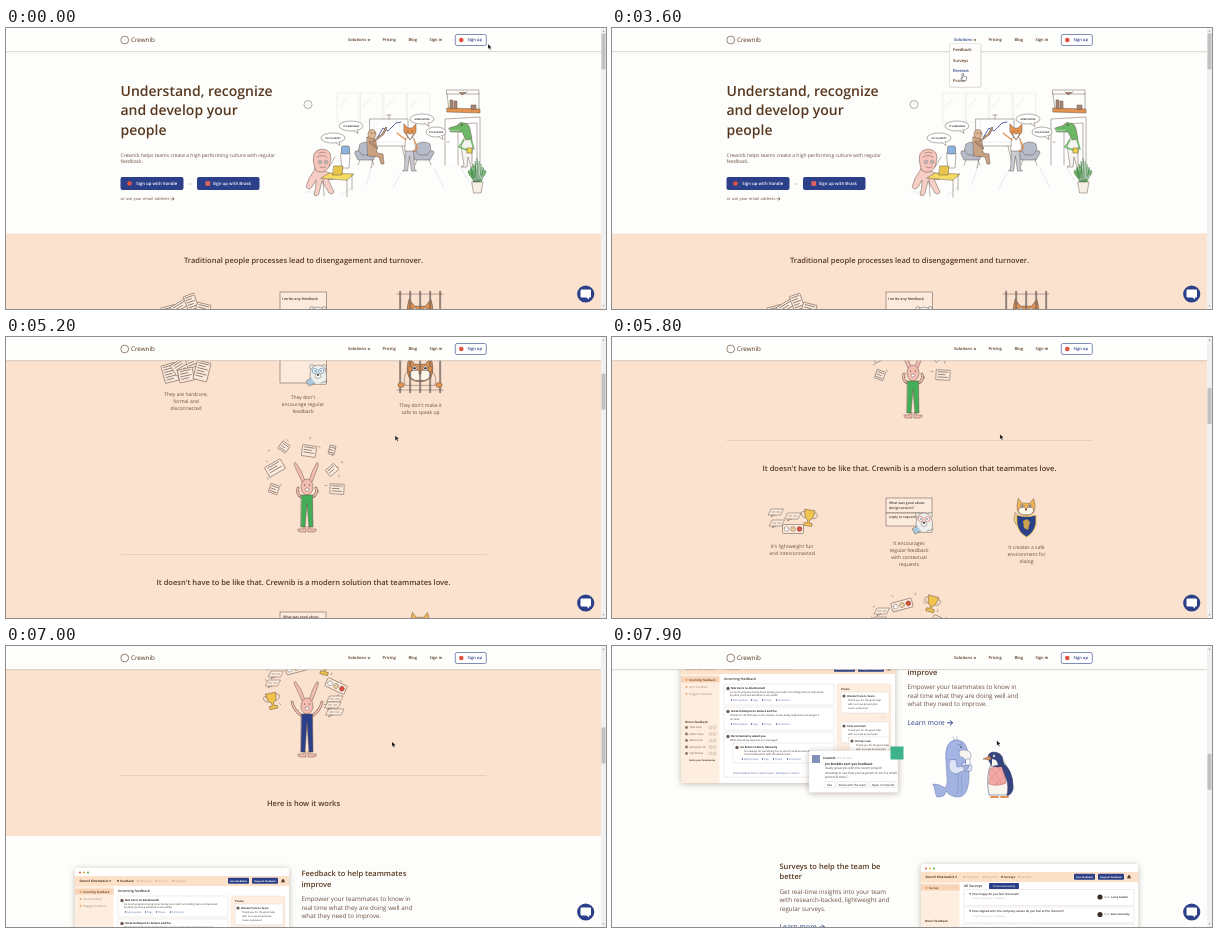
Animation, 600 px wide and 281 px high, one loop 8 s. Source, as an HTML page:

```html
<!DOCTYPE html>
<html lang="en">
<head>
<meta charset="utf-8">
<title>Crewnib</title>
<style>
html, body { margin: 0; width: 100%; height: 100%; overflow: hidden; background: #fdfefb; }
svg { display: block; width: 100vw; height: 100vh; font-family: "Open Sans", sans-serif; text-rendering: geometricPrecision; }
.raised { filter: drop-shadow(0 1.5px 3px #5a3a2559); }
</style>
</head>
<body>
<svg id="stage" viewBox="0 0 600 281"></svg>
<script>
const BROWN = '#57371f', SOFT = '#6b5145', NAVY = '#2c4089', PEACH = '#fae2cf', WHITE = '#fdfefb', CREAM = '#fcebdd',
  LINE = '#5f4a42', ORANGE = '#e3924f', PINK = '#f4bdb2', GOLD = '#f0c44c', PALE = '#dcdad7', INK = '#3d332e';

// Drawing helpers; every one returns SVG markup.
const T = (x, y, size, str, fill = BROWN, weight = 400, anchor = 'start') =>
  `<text x="${x}" y="${y + size * .36}" font-size="${size}" fill="${fill}" font-weight="${weight}" text-anchor="${anchor}">${str}</text>`;
const lines = (x, y, step, size, rows, ...style) => rows.map((s, i) => T(x, y + i * step, size, s, ...style)).join('');
const P = (d, fill = 'none', stroke = LINE, w = .45) =>
  `<path d="${d}" fill="${fill}" stroke="${stroke}" stroke-width="${w}" stroke-linecap="round" stroke-linejoin="round"/>`;
const R = (x, y, w, h, fill, stroke = 'none', r = 0, sw = .5) =>
  `<rect x="${x}" y="${y}" width="${w}" height="${h}" rx="${r}" fill="${fill}" stroke="${stroke}" stroke-width="${sw}"/>`;
const E = (x, y, rx, ry, fill, stroke = LINE, w = .45) =>
  `<ellipse cx="${x}" cy="${y}" rx="${rx}" ry="${ry}" fill="${fill}" stroke="${stroke}" stroke-width="${w}"/>`;
const C = (x, y, r, fill, stroke = 'none', w = .45) => E(x, y, r, r, fill, stroke, w);
const G = (x, y, turn, body, scale = 1) => `<g transform="translate(${x} ${y}) rotate(${turn}) scale(${scale})">${body}</g>`;
const raised = body => `<g class="raised">${body}</g>`;
const range = n => [...Array(n).keys()];
const arrow = (x, y, s, fill) => P(`M${x},${y}h${s}m${-s * .45},${-s * .45}l${s * .45},${s * .45}l${-s * .45},${s * .45}`, 'none', fill, s * .2);
const eyes = (x, y, gap, r = .7) => C(x - gap, y, r, '#333') + C(x + gap, y, r, '#333');

const paper = (x, y, w, h, turn) => G(x, y, turn, R(-w / 2, -h / 2, w, h, CREAM, LINE, .4) +
  range(Math.floor(h / 3)).map(i => P(`M${-w * .35},${-h / 2 + 2 + i * 2.6}h${w * (i % 2 ? .5 : .7)}`, 'none', LINE, .6)).join(''));
const bubble = (x, y, w, str) => E(x, y, w, 5, '#fff') +
  P(`M${x + 3},${y + 4.6}l4,3l-1,-4`, '#fff') + T(x, y, 2.3, str, '#333', 700, 'middle');
const trophy = (x, y, turn) => G(x, y, turn, P('M-5,-5q-5,0 -2,5q2,2 4,1M5,-5q5,0 2,5q-2,2 -4,1') +
  P('M-5,-7h10q0,9 -4,10v3h3v3h-8v-3h3v-3q-4,-1 -4,-10z', GOLD));
const faces = (x, y, turn) => G(x, y, turn, R(-10.5, -4.5, 21, 9, CREAM, LINE, 1) +
  ['#fff', '#f3d9a6', '#e5533f'].map((c, i) => C(-6.5 + i * 6.5, 0, 2.4, c, LINE) + eyes(-6.5 + i * 6.5, -.5, .8, .25)).join(''));
const chat = (x, y, w) => G(x, y, 0, P(`M${-w / 2 + 1.5},-3h${w}l-3,6h${-w}zM${-w / 2 + 2},3l-1,2l4,-2M${-w * .35},0h${w * .25}m2,0h${w * .25}`, CREAM));
const confetti = (x, y) => range(14).map(i => {
  const a = i * 2.4, r = 29 + (i * 7) % 17;
  return P(`M${x + r * Math.cos(a)},${y - 20 + r * .7 * Math.sin(a)}l${2 * Math.cos(i)},${2 * Math.sin(i)}`);
}).join('');

function office() {
  const windows = range(4).map(i => R(331 + i * 23.5, 65, 22, 29, 'none', PALE, 0, .4) + P(`M${333 + i * 23.5},80l8,-10`, 'none', PALE)).join('');
  const chair = x => P(`M${x - 8},123q-4,-1 -3,3l3,6h15l4,-7q0,-3 -3,-2l-1,-7q-6,-4 -13,0zM${x - 6},132l-2,5M${x + 6},132l2,5`, '#b7bccb') + P(`M${x - 7},123l3,4h8l3,-4`);
  const sloth = P('M361,109q6,-2 9,4l1,12l6,1l1,10h-3l-2,-7l-11,-1z', '#c9a282') + P('M368,113l9,-7l3,-6M364,114l7,6', 'none', LINE, 2) +
    P('M368,113l9,-7l3,-6M364,114l7,6', 'none', '#c9a282', 1.2) + E(366, 106, 4, 4.5, '#ddb794') + eyes(367, 105, 1.5, .6);
  const fox = P('M399.500,121l-1,20l-2,2h5l2,-15l2,15h5l-2,-2l-1,-20z', '#c9cbd2') + P('M400,110q5,-2 8,0l2,13h-11z', '#fff') +
    P('M398,96l4,4h4l4,-4v8l-6,8l-6,-8z', ORANGE) + P('M400,105l4,7l4,-7l-4,1z', '#fff') + eyes(404, 103, 2, .5) + P('M400,112l-9,-7M408,112l4,8l-5,3', 'none', ORANGE, 1.2);
  const croc = P('M439,137v-46l35,-2v48M452,137v-41l19,-1v42M441,114h2', '#fff') +
    P('M459,109q-5,5 -3,16l2,12l-3,2h6l1,-10l3,10h4l-3,-3v-12q2,-9 -1,-14z', '#f6f5f2') +
    P('M443,100l10,-3q1,-4 4,-2q6,0 7,6l2,10l-6,1l-4,-8l-11,0z', '#6cb866') + C(456, 97, .7, '#222') +
    P('M445,102l2,1l2,-1l2,1l2,-1', 'none', '#fff') + P('M458,112l-5,7l8,3M465,112l3,9', 'none', '#6cb866', 1.5) + R(461, 120, 5, 5, '#ecd94a', LINE);
  const octopus = P('M309,141q-7,9 -9,18q3,4 6,0l4,-7q0,9 -2,15q4,2 5,-2l3,-12l7,12q4,2 5,-1l-6,-13q7,2 8,-3l-9,-4z', '#f6cec5') +
    P('M309,141q-6,-19 7,-20q12,1 8,14q-1,7 -7,9q-6,1 -8,-3z', '#f6c6bc') + P('M311,129q5,-3 10,0M313,125q4,-2 7,0') + C(314, 134, 1.8, '#fff', LINE) + C(320, 134, 1.8, '#fff', LINE) +
    eyes(317, 134, 3, .7) + P('M314,139q3,2 6,0M323,139l6,-10');
  const desk = P('M315,150l8,-5l25,1l-7,6zM317,151l1,17M341,152v17M346,147v15', '#f4dc63') + P('M328,138h9l-1,9h-9z', '#e9c64a');
  const plant = range(9).map(i => P(`M471,156q${(i - 4) * 3},-12 ${(i - 4) * 2},${-26 + Math.abs(i - 4) * 3}q${5 - i},8 ${4 - i},${26 - Math.abs(i - 4) * 3}`, i % 2 ? '#4d9b57' : '#75b968', '#347041', .35)).join('') +
    P('M466,154h11l-2,11h-7z', '#f5f0e6');
  return windows + C(302, 76.5, 4, WHITE, LINE) + P('M302,74v2.5h2', 'none', PALE) +
    P('M345,160l-10,7M366,137l-6,20M395,145l-8,15M428,140l10,20M300,164h9M455,140l8,14', 'none', '#e3e2e8', .8) +
    P('M441,62h32v4h-32zM441,66l2,16M473,66v16', 'none') + P('M441,80l33,1v4l-33,-1z', ORANGE) + P('M453,64l3,3l5,-3M444,80v-8h3v8zM448,80v-7h3v7zM465,81v-4h5v4z', '#a98772') +
    P('M364,91h38v27h-38zM370,118l-5,22M396,118l5,22M383,91v-4M381,87h4', '#fff') +
    P('M371,110l6,-10l5,3l8,-8l5,-1', 'none', NAVY, .8) + P('M368,94v20h30', 'none', PALE) +
    P('M335,125h9l-1,15h-7z', '#fff') + R(335.5, 118, 8, 8, '#8bb4e2', LINE, 1.5) + chair(360) + chair(417) + sloth + fox + croc + octopus + desk + plant +
    bubble(327, 110, 12, "I'M SO HAPPY") + bubble(345, 98, 12, "IT'S AWESOME") + bubble(416, 91, 12, 'GREAT WORK') + bubble(430, 104, 10, 'YOU ROCKED');
}

const bear = (x, y, glasses) => C(x - 6, y - 7, 2.4, '#eef0ee', LINE) + C(x + 6, y - 7, 2.4, '#eef0ee', LINE) +
  P(`M${x - 7},${y + 10}q-4,-19 7,-19q11,0 8,19z`, '#eef0ee') + C(x - 3.3, y - 3, 2.5, '#fff', glasses, .8) + C(x + 3.3, y - 3, 2.5, '#fff', glasses, .8) +
  eyes(x, y - 3, 3, .7) + E(x, y + 2, 3, 2.3, '#fff') + C(x, y + 1, 1, '#333') + P(`M${x - 7},${y + 4}l-5,3l3,5l6,-3M${x + 3},${y + 9}l6,-2`, '#a9c9de');
const catHead = (x, y, s, fur) => G(x, y, 0, P('M-8,-10l4,5h8l4,-5q3,9 0,15q-8,6 -16,0q-3,-6 0,-15z', fur) +
  P('M-8,1q5,-4 8,0q3,-4 8,0q0,7 -8,6q-8,1 -8,-6z', '#fff6ea') + C(-4, -2, 1.8, '#fff', LINE) + C(4, -2, 1.8, '#fff', LINE) + eyes(0, -2, 4, .9) + C(0, 1.5, 1, '#704030'), s);

// The limbs are drawn twice: a dark outline below a thinner fill.
function bunny(x, y, pants, feet, arms) {
  return G(x, y, 0, P('M-2,-6Q-5,-17 -11.500,-24.500q-2,0 -1,3Q-8,-12 -5,-5zM2,-6Q5,-17 10,-24.500q2,0 1,4Q8,-12 5,-5z', PINK) +
    E(0, 0, 6, 8, PINK) + eyes(0, -2, 2.5, .6) + E(0, 2.5, 2, 1.5, '#fff') + P(arms, 'none', LINE, 2.6) + P(arms, 'none', PINK, 1.7) +
    P(`M-5.500,8h11l.5,${feet - 11}h-4l-2,${19 - feet}l-2,${feet - 19}h-4z`, pants) +
    P(`M-3,${feet - 3}v2l-6,0q-1,2 2,3h6v-5zM3,${feet - 3}v2l6,0q1,2 -2,3h-6v-5z`, PINK));
}

function features() {
  const bars = range(5).map(i => R(393.5 + i * 10, 263, 1.3, 44, '#8a817d', LINE, .5, .3)).join('');
  const cage = P('M399,299q-3,-10 4,-15l5,-2h12l5,2q7,6 4,15z', PEACH) + catHead(414, 285, 1.35, ORANGE) + bars +
    P('M391,266h46M391,304h46') + E(395, 299, 3.2, 2.5, ORANGE) + E(433, 299, 3.2, 2.5, ORANGE) + E(404, 283, 2, 2.8, ORANGE) + E(424, 283, 2, 2.8, ORANGE);
  const caption = (x, y, ...rows) => lines(x, y, 7, 5, rows, SOFT, 400, 'middle');
  const knight = P('M403,541q-3,10 4,14l3,-8z', '#f3d18f') + catHead(414, 536, .95, '#eeb356') +
    P('M405,543q9,3 19,0v9q-2,9 -9.500,13q-8,-4 -9.500,-13z', NAVY, GOLD, .9) + P('M411,549l4,-2l3,3l-2,8l-4,-2z', '#c9a24b', 'none');
  return paper(164, 287, 14, 18, -15) + paper(175, 280, 18, 12, -32) + paper(185, 274, 11, 15, -20) + paper(180, 289, 15, 13, -12) + paper(196, 285, 14, 19, 14) +
    R(274, 264, 46.5, 33, CREAM, LINE) + T(276, 270.5, 3.7, 'I write any feedback', '#4c3830', 600) + bear(312, 288, '#5a93bd') + cage +
    caption(180, 308.5, 'They are hardcore,', 'formal and', 'disconnected') +
    caption(297, 311, "They don't", 'encourage regular', 'feedback') + caption(414.5, 319, "They don't make it", 'safe to speak up') +
    confetti(301, 401) + paper(278, 361, 9, 9, 35) + paper(303, 365, 14, 11, 8) + paper(326, 364, 6, 9, 15) + paper(269, 382, 18, 11, -30) +
    paper(326, 384, 11, 8, -40) + paper(268, 403, 9, 9, 20) + paper(331, 403, 14, 10, 3) + bunny(301, 401, '#43ae58', 43, 'M-5,10q-6,-2 -4,-9M5,10q6,-2 4,-9') +
    P('M115,468.500H480', 'none', '#d5b9a8', .5) +
    T(297.5, 496, 7.5, "It doesn't have to be like that. Crewnib is a modern solution that teammates love.", BROWN, 600, 'middle') +
    chat(164, 540, 12) + chat(181, 544, 13) + chat(165, 551, 12) + faces(181, 557, 0) + trophy(197, 545, 8) +
    R(274, 526, 46, 15, CREAM, LINE) + lines(277, 531, 5.2, 3.4, ['What was good about', 'design session?'], '#4c3830', 600) +
    R(274, 541, 37, 13, CREAM, LINE) + T(277, 545, 3.3, '(reply to request)', '#4c3830', 600) + bear(312, 550, '#d8706a') + knight +
    caption(180, 574, "It's lightweight fun", 'and interconnected') +
    caption(297, 571, 'It encourages', 'regular feedback', 'with contextual', 'requests') + caption(414.5, 575, 'It creates a safe', 'environment for', 'dialog') +
    confetti(300, 671) + faces(290, 633, -15) + trophy(320, 631, 15) + chat(270, 639, 12) + chat(267, 648, 12) + faces(330, 651, 25) +
    trophy(266, 665, -12) + chat(329, 664, 13) + chat(327, 670, 13) + chat(329, 677, 15) + bunny(301, 671, NAVY, 49, 'M-5,10q-8,-5 -10,-14M5,10q8,-5 10,-14');
}

const person = (x, y, name) => C(x, y, 1.7, '#6f5d54') + T(x + 3, y - .8, 2.7, name, '#2e2622', 700);
const actions = (x, y) => ['Add a praise', 'Flag', 'Thank', 'Comment'].map((s, i) => {
  const ax = x + [0, 20, 31, 45][i];
  return C(ax - 1.5, y, .7, NAVY) + T(ax, y, 2.5, s, '#4f63a4');
}).join('');

// Shared frame of the two product screenshots.
function app(x, y, w, h, tab) {
  const side = tab ? ['Survey'] : ['Incoming feedback', 'Sent feedback', 'Flagged feedback'];
  const crew = ['Tilda Nork', 'Edwin Trass', 'Moira Lusk', 'Fernando Od.', 'Suki Dranel'];
  return raised(R(x, y, w, h, '#fff', 'none', 1.5)) +
    ['#e8604f', '#edb63e', '#5cb955'].map((c, i) => C(x + 5 + i * 4, y + 4.5, 1.1, c)).join('') +
    R(x, y + 8, w, 10, '#fce0c8') + R(x, y + 18, 38.5, h - 18, '#fdeee0') +
    T(x + 4.5, y + 12.8, 3.2, 'Dovrel Kinematics ▾', BROWN, 700) +
    ['Feedback', 'Requests', 'Surveys', 'Reviews'].map((s, i) => {
      const tx = x + [45, 65, 83, 100][i], on = i === tab * 2;
      return C(tx - 2, y + 12.8, .9, on ? BROWN : '#c9a58d') + T(tx, y + 12.8, 2.9, s, on ? BROWN : '#c9a58d', on ? 700 : 400);
    }).join('') +
    R(x + 153, y + 9.8, 21, 6, NAVY, 'none', .8) + T(x + 163.5, y + 12.8, 2.4, 'Give feedback', '#fff', 700, 'middle') +
    R(x + 177, y + 9.8, 26, 6, NAVY, 'none', .8) + T(x + 190, y + 12.8, 2.4, 'Request feedback', '#fff', 700, 'middle') +
    P(`M${x + 206.5},${y + 14}q.5,-3 1.500,-3q1,0 1.500,3z`, BROWN) +
    R(x, y + 20.5, 38.5, 6, '#f9d3b5') +
    side.map((s, i) => C(x + 5.5, y + 23.8 + i * 7, .9, ORANGE) + T(x + 8, y + 23.8 + i * 7, 2.9, s, i ? '#a98975' : BROWN, i ? 400 : 600)).join('') +
    (tab ? T(x + 4, y + 56.5, 2.9, 'Direct feedback', BROWN, 700) :
      T(x + 4, y + 65.5, 2.9, 'Direct feedback', BROWN, 700) + crew.map((s, i) => {
        const cy = y + 71.5 + i * 6.5;
        return C(x + 5.5, cy, 1.4, '#8d7468') + T(x + 8.5, cy, 2.6, s, SOFT) + C(x + 29.5, cy, 1.4, 'none', '#a98975', .4) + C(x + 33.5, cy, 1.4, 'none', '#a98975', .4);
      }).join('') + T(x + 8, y + 104.5, 2.3, 'Invite your teammates', BROWN, 700));
}

function feedbackApp() {
  const card = (x, y, w, h) => R(x, y, w, h, '#fff', '#d6d0cb', 1, .4);
  const praise = (x, y, w, name) => card(x, y, w, 21) + C(x + 3, y + 4, 1.6, '#6f5d54') + T(x + 6, y + 4, 2.6, name, INK, 700) +
    lines(x + 7, y + 8.5, 3.7, 2.5, ['Thank you for the great help', 'with our new project plan', 'It was a pleasure!'], INK);
  return app(69, 833, 214, 127, 0) + T(112, 855.3, 3.5, 'Incoming feedback', INK, 600) +
    card(112, 861, 110, 21) + person(116, 865.5, 'Nils Varro to Ada Brumell') + lines(118, 869, 3.5, 2.6, ['So much progress being done during your talk! I am sitting here so impressed', 'by what you have achieved in one week.'], INK) + actions(121, 877) +
    card(112, 884, 110, 23) + person(116, 888.5, 'Greta Holmquin to Anders and Pia') + lines(118, 892.5, 3.5, 2.6, ['Thanks for all the help on the release. It was easily explained and we got it', 'on time.'], INK) + actions(121, 901) +
    card(112, 909, 110, 45) + person(116, 913.5, 'Boris Hannetty asked you') + T(118, 917, 2.6, 'What should we improve as a manager?', INK) +
    card(121, 920, 101, 20) + person(125, 924.5, 'Ivo Brenn to Boris Hannetty') + lines(132, 928, 3.5, 2.6, ['You always do something for us and it could be even better to get', 'more transparent with the whole team.'], INK) + actions(132, 936) +
    T(121, 950, 2.6, 'View feedback from 3 teammates • Waiting for 4 others', '#4f63a4') +
    R(225, 861, 54, 95, '#fdeee0', '#f1dccb', 1, .4) + T(229, 865.5, 2.8, 'Praise', BROWN, 700) +
    praise(229, 869, 48, 'Wanda Prule to Team') + T(267, 894, 2.4, '♡  ▢', '#b99b88') + praise(229, 899, 48, 'Tilda and Nork') + praise(237, 914, 40, 'Wendy Lusk') +
    raised(R(197, 927.5, 89, 42, '#fff', '#e4dfda', 2, .4)) +
    R(200, 932, 8, 8, '#8390b9') + T(211, 935, 3, 'Crewnib', '#2e2a28', 700) + T(225, 935, 2.3, 'APP  9:41 AM  ☆', '#a29b96') +
    T(213, 940.5, 3.15, 'Jon Breddle sent you feedback', '#2e2a28', 700) +
    lines(213, 945, 4.6, 3.15, ['Really great job with the recent project!', "Amazing to see how you've grown in such a small", 'period of time 👏'], '#4a4542') +
    [[212, 11, 'Like'], [225, 31, 'Share with the team'], [258, 26, 'Open in Crewnib']].map(([x, w, s]) => card(x, 958.5, w, 6) + T(x + w / 2, 961.5, 2.8, s, '#4a4542', 600, 'middle')).join('') +
    R(278.5, 923.5, 13, 13, '#3eb28a');
}

function surveyApp() {
  const row = (y, q, name) => R(352, y, 170, 16, '#fff', '#d6d0cb', 1, .4) + T(357, y + 4, 2.9, '✎  ' + q, INK, 600) +
    T(361, y + 9, 2.4, 'Sent to everyone • 9 answers', '#b5aca6') + C(488, y + 7.5, 2.6, '#3a2d28') + T(492, y + 7.5, 2.5, 'From', SOFT) + T(499, y + 7.5, 2.5, name, INK, 700);
  return app(309, 1041, 217, 127, 1) + T(352, 1063, 3.5, 'All Surveys', INK, 600) + R(377, 1060, 30, 6, NAVY, 'none', .8) +
    T(392, 1063, 2.5, 'Create new survey', '#fff', 600, 'middle') + row(1066.5, 'How happy do you feel this week?', 'Lorna Teskell') +
    row(1084, 'How aligned with the company values do you feel at the moment?', 'Boris Hannetty') + row(1101, 'What do you think about our way of working?', 'Ada Brumell');
}

const SEA = '#a3b3e2', SEA_LINE = '#5a69a3', COAT = '#37457f';
const narwhal = P('M334,938q-2,-19 9,-21q11,-1 13,13l1,16q1,27 -10,28q-9,0 -13,-6q0,6 -9,6q-2,-3 -2,-7l-2,-6q7,0 12,4q3,-4 2,-10z', SEA, SEA_LINE) +
  P('M346,951q1,12 -1,20M349,953q2,10 0,18', 'none', '#8596cf', .7) + P('M342,917l-1,-3M345,917v-3', 'none', SEA_LINE) +
  P('M347,928q6,-3 11,1q3,6 -2,8q-4,1 -5,-3q-4,2 -4,-6z', '#f7f3ee', SEA_LINE) + C(349, 924, .8, '#333') + P('M346,922l4,-1', 'none', SEA_LINE) +
  P('M338,937q-4,12 6,14l12,-5l1,-4l-12,2l-1,-7zM350,940q7,-2 10,3l-1,5l-6,0z', '#dfe5f7', SEA_LINE) + P('M354,936h4v6h-4z', '#fff', SEA_LINE);
const penguin = P('M380,939q-7,13 -3,33h16q9,-2 8,-9q-1,-14 -9,-24z', '#f9f4ee', '#27315c') +
  P('M378,946q7,-5 14,-1l2,15q-9,4 -17,1z', '#f2a9a4', '#a8575c') + P('M378,942l12,19M377,951l9,10M384,942l9,13M390,944l-12,13M393,952l-9,9', 'none', '#c9727a', .35) +
  P('M389,939q12,7 12,25q0,7 -6,9q2,-11 -1,-18q-4,-8 -5,-16z', COAT, '#27315c') +
  P('M377,938q-3,-8 4,-9q9,0 10,8l1,6q-6,2 -12,0z', COAT, '#27315c') + P('M380,936q5,0 6,6l-6,1z', '#f9f4ee', 'none') +
  P('M378,933l-7,3l8,1z', ORANGE) + C(382, 933, 1.2, '#fff') + C(382, 933, .6, '#222') + P('M379,974h7M389,974h7', 'none', ORANGE, 1.8);

const pitch = (x, y, title, body) => lines(x, y, 10.5, 7.5, title, BROWN, 600) + lines(x, y + 25.5, 8.6, 6.25, body, SOFT) +
  T(x, y + 61, 6.9, 'Learn more', NAVY) + arrow(x + 40, y + 61.3, 5, NAVY);
const cta = (x, w, label, mark) => R(x, 149, w, 13, NAVY, 'none', 2) + mark + T(x + 15.8, 155.7, 4.3, label, '#fff', 600);

const page = R(0, 205.5, 595, 595.5, PEACH) +
  lines(114.5, 63.2, 19.2, 14, ['Understand, recognize', 'and develop your', 'people'], BROWN, 600) +
  lines(114.5, 126.7, 6.8, 5, ['Crewnib helps teams create a high performing culture with regular', 'feedback.'], SOFT) +
  cta(114.5, 63, 'Sign up with Vondle', C(123.5, 155.5, 2.3, '#e0523f')) + T(182, 155.7, 4, 'or', '#c3b7ae') +
  cta(191, 62.5, 'Sign up with Brask', R(199.5, 153.2, 4.6, 4.6, '#e0655f')) +
  T(114.5, 171, 4.05, 'or use your email address', SOFT) + arrow(165, 170.9, 3, BROWN) + office() +
  T(297.5, 232.5, 7.5, 'Traditional people processes lead to disengagement and turnover.', BROWN, 600, 'middle') + features() +
  P('M115,740.500H480', 'none', '#d5b9a8', .5) + T(297.5, 768, 7.5, 'Here is how it works', BROWN, 600, 'middle') + feedbackApp() +
  pitch(295.5, 838.5, ['Feedback to help teammates', 'improve'], ['Empower your teammates to know in', 'real time what they are doing well and', 'what they need to improve.']) + narwhal + penguin +
  pitch(167.5, 1042.8, ['Surveys to help the team be', 'better'], ['Get real-time insights into your team', 'with research-backed, lightweight and', 'regular surveys.']) + surveyApp();

const NAV = [[342, 25, 'Solutions'], [376.5, 14, 'Pricing'], [402.5, 9, 'Blog'], [423.5, 14, 'Sign in']];
const MENU = ['Feedback', 'Surveys', 'Reviews', 'Praise'];
const link = (x, y, s) => `<g class="link">${T(x, y, 4.05, s, 'inherit', 600)}</g>`;
const header = R(0, 23, 595, 1.5, '#8b7a6a22') + R(0, 0, 595, 23, '#fefefc') + R(0, 23, 595, .6, '#d8d0c9') +
  C(118.7, 12, 3.9, 'none', BROWN, .6) + T(125, 12.2, 6.25, 'Crewnib', BROWN) + NAV.map(([x, , s]) => link(x, 12, s)).join('') +
  P('M361.800,11.500h2.400l-1.200,1.500z', BROWN, BROWN, .2) + '<g id="signup">' + R(449.3, 6.5, 31, 11, 'inherit', NAVY, 1.8, .6) + '</g>' +
  C(455.3, 12, 2.3, '#e0523f') + T(461.5, 12, 4.1, 'Sign up', NAVY, 600);
const dropdown = '<g id="menu">' + R(337, 15.5, 32.5, 44.5, '#7a6a5e30', 'none', 2) + R(337.6, 15.5, 31, 43.5, '#fffefc', '#ddd5ce', 1.5, .5) +
  MENU.map((s, i) => link(341, 21.9 + i * 10.25, s)).join('') + '</g>';
const chrome = C(579.7, 266, 8.6, NAVY) + P('M575.500,261.500h8.500q1,0 1,1v6q0,1 -1,1h-1v2l-2.500,-2h-5q-1,0 -1,-1v-6q0,-1 1,-1z', '#fff', 'none') +
  R(595, 0, 5, 281, '#f1f1f1') + '<g id="thumb">' + R(595.5, 5.5, 4, 36, '#c1c1c1') + '</g>' +
  P('M596.500,3.500h2l-1,-1.200zM596.500,277.500h2l-1,1.200z', '#777', 'none');
const pointer = '<g id="cursor"><g id="arrow">' + P('M0,0v5l1.200,-1l.9,1.800l.9,-.4l-.9,-1.800l1.600,-.1z', '#111', '#fff', .25) + '</g><g id="hand">' +
  P('M-.5,0q.7,-.7 1.300,0v2.400l2.600,.6q.7,.3 .5,1.200l-.6,2.800h-3l-2.200,-2.700q.2,-.8 1.400,0z', '#fff', '#111', .45) + '</g></g>';

const $ = id => document.getElementById(id);
$('stage').innerHTML = `<g id="page">${page}</g>${header}${dropdown}${chrome}${pointer}`;
const links = [...document.querySelectorAll('.link')];
links.forEach(g => g.firstChild.removeAttribute('fill'));
$('signup').firstChild.removeAttribute('fill');

const SCROLL = [[4400, 0], [4600, 54.4], [5200, 251], [6200, 441], [6400, 443], [6600, 490], [7400, 732], [7900, 823]];
const CURSOR = [[0, 482, 16], [900, 442, 14], [1800, 363, 13], [2000, 357, 12], [2200, 357, 12], [2400, 355, 20], [2600, 355, 20],
  [2900, 352, 37], [3000, 352, 37], [3900, 350, 50], [4300, 391, 99], [4600, 391, 99], [5200, 389.2, 98.5], [6400, 386.7, 96], [7400, 385.5, 95.5], [7900, 384.8, 94.5]];

function at(keys, t) {
  const i = keys.findIndex(k => k[0] > t);
  if (i < 0) return keys[keys.length - 1].slice(1);
  if (!i) return keys[0].slice(1);
  const [a, b] = [keys[i - 1], keys[i]], u = (t - a[0]) / (b[0] - a[0]);
  return a.slice(1).map((v, j) => v + (b[j + 1] - v) * u);
}

function draw() {
  const t = Math.floor(performance.now() % 8000 / 100) * 100;
  const [scroll] = at(SCROLL, t), [x, y] = at(CURSOR, t);
  const open = t >= 1800 && t < 4100;
  const nav = y < 19 ? NAV.findIndex(([nx, w]) => x >= nx && x < nx + w) : -1;
  const item = open && y >= 17 ? Math.floor((y - 17) / 10.25) : -1;
  const signup = y < 18 && x > 449 && x < 480;
  const hand = nav >= 0 || item >= 0 || signup;
  $('page').setAttribute('transform', `translate(0 ${-scroll})`);
  $('thumb').setAttribute('transform', `translate(0 ${scroll / 8.05})`);
  $('cursor').setAttribute('transform', `translate(${x} ${y})`);
  $('menu').style.display = open ? '' : 'none';
  $('hand').style.display = hand ? '' : 'none';
  $('arrow').style.display = hand ? 'none' : '';
  $('signup').style.fill = signup ? '#eef0fa' : '#fff';
  links.forEach((g, i) => {
    const on = i < NAV.length ? i === nav || (open && !i) : i - NAV.length === item;
    g.style.fill = on ? NAVY : BROWN;
  });
  requestAnimationFrame(draw);
}
draw();
</script>
</body>
</html>
```
